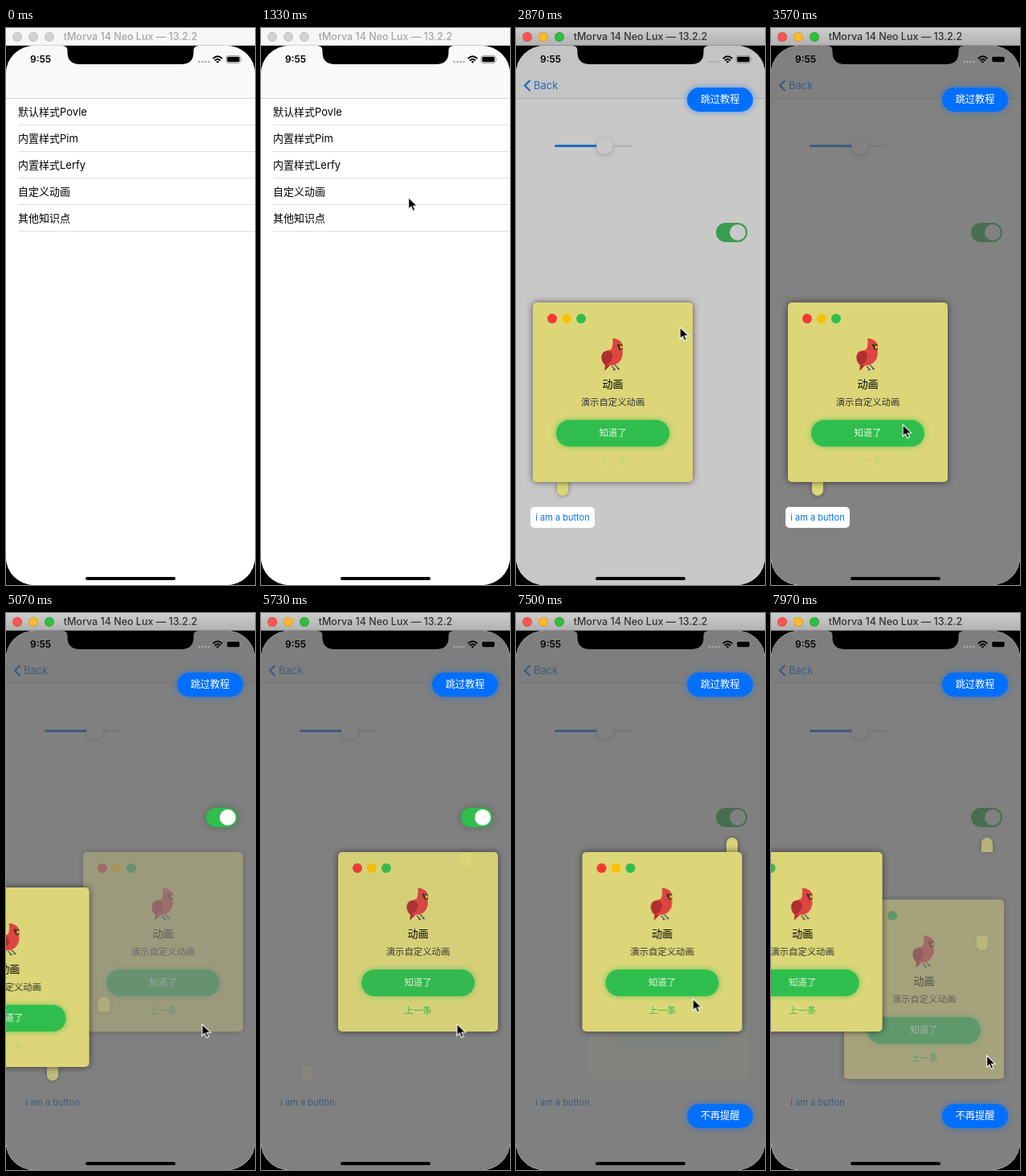
Write an HTML page that moves like this. It is 310 by 692 pixels and loops after 8 s.

```html
<!DOCTYPE html>
<html lang="zh-CN">
<head>
<meta charset="utf-8">
<title>Guide demo</title>
<style>
html, body { margin: 0; width: 100%; height: 100%; overflow: hidden; background: #000; }
#stage { position: absolute; left: 0; top: 0; width: 310px; height: 692px; overflow: hidden;
  font: 13px/20px Inter, "Noto Sans CJK SC", "Noto Sans CJK", sans-serif; color: #000; }
#stage div, #stage svg, #stage i { position: absolute; box-sizing: border-box; white-space: nowrap; }

/* every animation shares one 8 s clock */
.anim { animation: 8s linear infinite both; }

/* window title bar */
.bar { left: 0; top: 0; width: 310px; height: 22px; background: #f6f6f6; border-bottom: 1px solid #d4d4d4;
  color: #a6a6a6; font-size: 12.5px; font-weight: 500; line-height: 22px; text-align: center; }
.bar.on { background: linear-gradient(#cdcdcd, #b2b2b2); border-color: #939393; color: #333; animation-name: wake; }
.bar i { top: 5px; width: 12px; height: 12px; border-radius: 50%; background: #d2d2d2; border: 1px solid #c2c2c2; }
.bar.on i { border-color: #0002; }
@keyframes wake { 0% { opacity: 0; animation-timing-function: step-end } 18.75%, 100% { opacity: 1 } }

/* phone screen */
#screen { left: 0; top: 22px; width: 310px; height: 670px; border-radius: 35px; overflow: hidden; background: #fff; }
#view { left: 0; top: -22px; width: 310px; height: 692px; }
.nav { left: 0; top: 22px; width: 310px; height: 66px; background: #f9f9f9; border-bottom: 1px solid #d2d2d4; }
.back { left: 0; top: 61px; width: 80px; height: 20px; color: #007aff; padding-left: 22px; animation-name: back; }
.back svg { left: 9px; top: 3px; }
@keyframes back { 0%, 19.6% { opacity: 0 } 23.5%, 100% { opacity: 1 } }

.list { left: 0; top: 88px; width: 310px; height: 604px; background: #fff; animation-name: list; }
.row { left: 0; width: 310px; height: 33px; padding: 6px 15px; }
.row::after { content: ""; position: absolute; left: 15px; right: 0; bottom: 0; height: 1px; background: #dfdfe1; }
.pick { left: 0; top: 98px; width: 310px; height: 33px; background: #dcdcde; animation-name: wake; }
.shade { inset: 0; background: #000; animation-name: shade; }
@keyframes list { 0%, 19.6% { transform: none; animation-timing-function: ease } 26.4%, 100% { transform: translateX(-93px) } }
@keyframes shade { 0%, 19.6% { opacity: 0; animation-timing-function: ease } 26.4%, 100% { opacity: .09 } }

.page { left: 0; top: 88px; width: 310px; height: 604px; background: #fff; animation-name: page; }
@keyframes page { 0%, 19.6% { transform: translateX(310px); animation-timing-function: ease } 26.4%, 100% { transform: none } }
.track { left: 48px; top: 57px; width: 96px; height: 3px; border-radius: 2px;
  background: linear-gradient(90deg, #0a78f5 63px, #e3e3e5 63px); }
.thumb { left: 100px; top: 48px; width: 21px; height: 21px; border-radius: 50%; background: #fff;
  box-shadow: 0 2px 6px #0003, 0 0 1px #0003; }
.toggle { left: 249px; width: 39px; height: 24px; border-radius: 12px; background: #2fbe4d; }
.toggle::after { content: ""; position: absolute; right: 2px; top: 2px; width: 20px; height: 20px; border-radius: 50%; background: #fff; }
.link { color: #0a74f0; font-size: 11px; text-align: center; left: 18px; width: 80px; height: 26px; line-height: 26px; }

/* guide layer */
.dim { left: 0; top: 22px; width: 310px; height: 670px; background: #525252; animation-name: dim; }
@keyframes dim { 0%, 27.25% { opacity: 0; animation-timing-function: ease-in-out } 46%, 100% { opacity: .73 } }
.pill { left: 213px; width: 82px; height: 30px; border-radius: 15px; background: #006fff; color: #fff;
  font-size: 12.2px; line-height: 30px; text-align: center; box-shadow: 0 0 8px #0a6ff299; }
.skip { top: 74px; animation-name: skip; }
.never { top: 610px; animation-name: never; }
.spot1 { top: 595px; background: #fff; border-radius: 5px; animation-name: spot1; }
.spot2 { top: 242px; box-shadow: 0 0 10px #1c5a3080; animation-name: spot2; }
.skip, .never, .spot1, .spot2 { animation-timing-function: step-end !important; }
@keyframes skip { 0% { opacity: 0 } 27.25%, 100% { opacity: 1 } }
@keyframes never { 0% { opacity: 0 } 91%, 100% { opacity: 1 } }
@keyframes spot1 { 0% { opacity: 0 } 27.25% { opacity: 1 } 56.23%, 100% { opacity: 0 } }
@keyframes spot2 { 0% { opacity: 0 } 56.23% { opacity: 1 } 91%, 100% { opacity: 0 } }

.tail { left: 0; top: 0; width: 13.5px; height: 18px; background: #dcd678; box-shadow: 0 0 6px #0006; border-radius: 0 0 7px 7px; }
.tail.up { border-radius: 7px 7px 0 0; }
.t1 { animation-name: t1; }
.t2 { animation-name: t2; }
.t3 { animation-name: t3; }
@keyframes t1 {
  0% { opacity: 0; transform: translate(51px, 563px); animation-timing-function: step-end }
  27.25% { opacity: 1; animation-timing-function: step-end }
  56.23% { opacity: 1; animation-timing-function: ease-in-out }
  74.98%, 100% { opacity: 0; transform: translate(51px, 563px) }
}
@keyframes t2 {
  0%, 56.23% { opacity: 0; transform: translate(51px, 563px); animation-timing-function: ease-in-out }
  74.98%, 91.27% { opacity: 1; transform: translate(262px, 279px); animation-timing-function: cubic-bezier(.415, 0, .712, .481) }
  100% { opacity: .56; transform: translate(262px, 279px) }
}
@keyframes t3 {
  0%, 91.27% { opacity: 0; transform: translate(262px, 279px); animation-timing-function: cubic-bezier(.415, 0, .712, .481) }
  100% { opacity: .44; transform: translate(255.4px, 411px) }
}

.card { width: 199px; height: 223px; border-radius: 5px; background: #dcd678; box-shadow: 0 0 8px #0009; }
.card i { top: 14px; width: 12px; height: 12px; border-radius: 50%; }
.card div { left: 0; width: 199px; text-align: center; font-size: 11.4px; }
.card svg { left: 85px; top: 44px; }
.card .name { top: 91px; font-size: 13px; font-weight: 500; }
.card .note { top: 114px; color: #333; }
.card .ok { left: 29px; top: 146px; width: 141px; height: 33px; line-height: 33px; border-radius: 17px;
  background: #2fbe4d; color: #e9f7e4; box-shadow: 0 0 7px #2fbe4db0; }
.card .prev { top: 187px; color: #2fbe4d; }
.c1 { left: 21px; top: 341px; animation-name: c1; }
.c1 .prev { opacity: .16; }
.c2 { left: 96px; top: 297px; animation-name: c2; }
.c3 { left: 91px; top: 356px; animation-name: c3; }
@keyframes c1 {
  0% { opacity: 0; transform: none; animation-timing-function: step-end }
  27.25% { opacity: 1; transform: none; animation-timing-function: step-end }
  56.23% { opacity: 1; transform: none; animation-timing-function: ease-in-out }
  74.98%, 100% { opacity: 1; transform: translateX(-384px) }
}
@keyframes c2 {
  0%, 56.23% { opacity: 0; transform: none; animation-timing-function: ease-in-out }
  74.98%, 91.27% { opacity: 1; transform: none; animation-timing-function: cubic-bezier(.415, 0, .712, .481) }
  100% { opacity: 1; transform: translateX(-169px) }
}
@keyframes c3 {
  0%, 91.27% { opacity: 0; animation-timing-function: cubic-bezier(.415, 0, .712, .481) }
  100% { opacity: .44 }
}

/* status bar and pointer */
.time { left: 30px; top: 29px; font-size: 12px; font-weight: 600; }
.hw { left: 0; top: 0; }
.pointer { left: 0; top: 0; animation-name: point; animation-timing-function: ease-in-out !important; }
@keyframes point {
  0%, 8.2% { opacity: 0; transform: translate(312px, 112px) }
  8.38% { opacity: 1; transform: translate(306px, 112px) }
  13% { transform: translate(84px, 160px) }
  17.1%, 25% { transform: translate(185.5px, 211px) }
  35.9% { transform: translate(203.5px, 371px) }
  44.6%, 56.2% { transform: translate(163.5px, 492px) }
  63.3%, 71% { transform: translate(243.5px, 510px) }
  82%, 91% { transform: translate(205.5px, 458px) }
  99.4%, 100% { opacity: 1; transform: translate(268px, 549px) }
}
</style>
</head>
<body>
<div id="stage">
  <div id="screen"><div id="view">
    <div class="list anim">
      <div class="pick anim"></div>
      <div class="row" style="top:0">默认样式Povle</div>
      <div class="row" style="top:33px">内置样式Pim</div>
      <div class="row" style="top:66px">内置样式Lerfy</div>
      <div class="row" style="top:99px">自定义动画</div>
      <div class="row" style="top:132px">其他知识点</div>
      <div class="shade anim"></div>
    </div>
    <div class="page anim">
      <div class="track"></div><div class="thumb"></div>
      <div class="toggle" style="top:154px"></div>
      <div class="link" style="top:507px">i am a button</div>
    </div>
    <div class="nav"></div>
    <div class="back anim"><svg width="10" height="15"><path d="M8.5 1L2 7.5 8.5 14" fill="none" stroke="#007aff" stroke-width="2.2"/></svg>Back</div>

    <div class="dim anim"></div>
    <div class="pill skip anim">跳过教程</div>
    <div class="pill never anim">不再提醒</div>
    <div class="link spot1 anim">i am a button</div>
    <div class="toggle spot2 anim"></div>
    <div class="tail t3 anim"></div>
    <div class="tail t1 anim"></div>
    <div class="tail up t2 anim"></div>
    <div class="card c3 anim"></div>
    <div class="card c2 anim"></div>
    <div class="card c1 anim"></div>

    <div class="time">9:55</div>
    <svg class="hw" width="310" height="692">
      <path d="M70 22Q76.500 22 76.500 28V30Q76.500 45 92 45H218Q233.500 45 233.500 30V28Q233.500 22 240 22Z"/>
      <g fill="#a9a9ab"><circle cx="240.500" cy="42" r="1.300"/><circle cx="244.500" cy="42" r="1.300"/><circle cx="248.500" cy="42" r="1.300"/><circle cx="252.500" cy="42" r="1.300"/></g>
      <g fill="none" stroke="#000" stroke-width="1.900"><path d="M257.800 38Q263.500 32.600 269.200 38"/><path d="M260 40.500Q263.500 37.200 267 40.500"/></g>
      <path d="M261.600 41.800Q263.500 40.200 265.400 41.800L263.500 43.800Z"/>
      <rect x="274" y="34.500" width="18" height="9" rx="2.500" fill="none" stroke="#8a8a8a" stroke-width=".8"/>
      <rect x="275.300" y="35.800" width="15.400" height="6.400" rx="1.400"/>
      <path d="M293 37.500Q294.500 39 293 40.500Z" fill="#8a8a8a"/>
      <rect x="99" y="682" width="112" height="4" rx="2"/>
    </svg>
  </div></div>
  <div class="bar"></div>
  <div class="bar on anim"></div>
  <svg class="pointer anim" width="14" height="21"><path d="M.7 .8V15.200L4 12.200 6.300 17.600 8.900 16.500 6.600 11.200H11.200Z" stroke="#fff" stroke-width="1.100"/></svg>
</div>
<script>
const dots = (colors, x, step) => colors
  .map((c, i) => `<i style="left:${x + i * step}px;background:${c}"></i>`).join('');
const fill = (sel, html) => document.querySelectorAll(sel).forEach(el => { el.innerHTML = html; });

const title = 'tMorva 14 Neo Lux — 13.2.2';
fill('.bar', dots(['#d2d2d2', '#d2d2d2', '#d2d2d2'], 8, 20) + title);
fill('.bar.on', dots(['#fc5650', '#fdb92c', '#30bf3e'], 8, 20) + title);

const bird = `<svg width="30" height="42">
  <path d="M13 35L17 39.500M17 33.500L22 38.500M15 39.500H18M20 38.500H23" stroke="#55565e" stroke-width="1.300" fill="none"/>
  <path d="M14 .5Q23 1 26 7Q28 11 26.500 16C28.500 27 20 35 11 34L4.500 40.500 5 33C-1 28-1 20 4 17Q9 15.500 13 14Q15.500 7 14 .5Z" fill="#dc4540"/>
  <path d="M3.500 17.500C9 14 15 18 14 24C13 30 8 33 5 34C0 30-1 22 3.500 17.500ZM5 34L4.500 40.500 11 34Z" fill="#b02d30"/>
  <path d="M20 9.500L26 7.500 27 14 23 15.500Z" fill="#4b2a2c"/>
  <path d="M23.500 9L28.500 11.500 24 14Z" fill="#f2b23a"/>
  <circle cx="21" cy="8.500" r="1" fill="#2b2022"/></svg>`;
fill('.card', dots(['#f23a31', '#fdc000', '#2fbe4d'], 17.5, 18) + bird +
  '<div class="name">动画</div><div class="note">演示自定义动画</div>' +
  '<div class="ok">知道了</div><div class="prev">上一条</div>');
</script>
</body>
</html>
```
